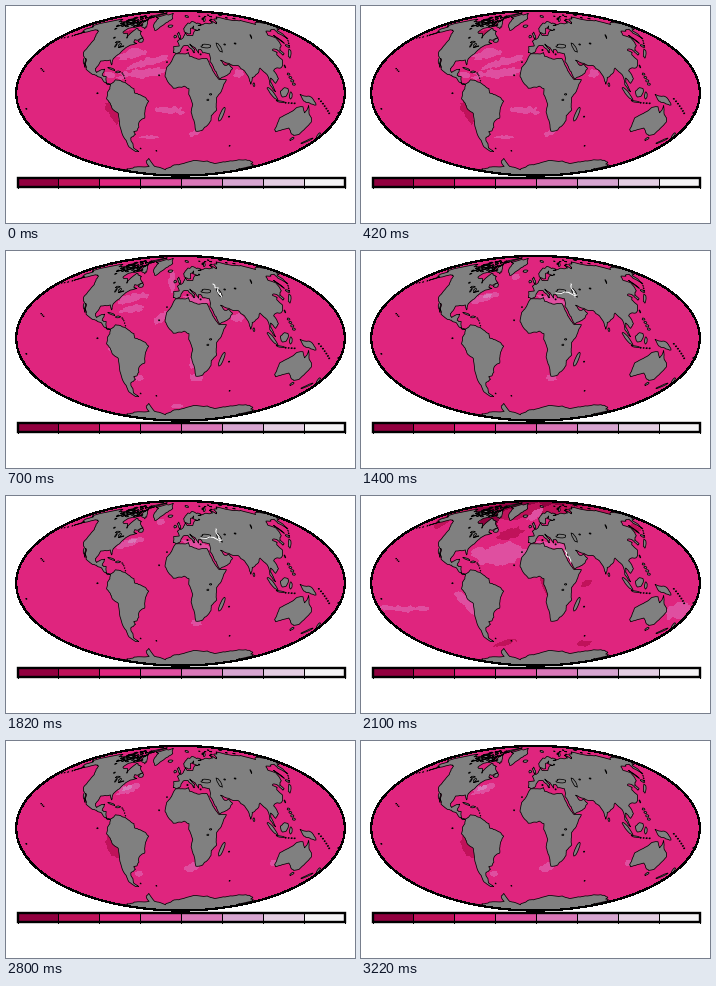
A matplotlib script that plays this animation: 349 by 217 pixels, repeating every 3500 ms.

```python
import numpy as np
import matplotlib.pyplot as plt
from matplotlib.animation import FuncAnimation
from matplotlib.patches import Ellipse, Polygon, Rectangle

W, H, DPI = 349, 217, 64
CX, CY, RX, RY = 174.5, 87.2, 164.3, 82.3
PX = 72 / DPI
LEVELS = ["#91003f", "#c0125a", "#df257e", "#df4fa0",
          "#d978b8", "#d6a5d0", "#e3cee2", "#f5f4f6"]
DARK, RED, SEA, PINK, PALE = LEVELS[:5]
GRAY = "#808080"

rng = np.random.default_rng(4)
fig = plt.figure(figsize=(W / DPI, H / DPI), dpi=DPI, facecolor="white")
ax = fig.add_axes([0, 0, 1, 1])
ax.set(xlim=(0, W), ylim=(H, 0))
ax.axis("off")

globe = Ellipse((CX, CY), 2 * RX, 2 * RY, fc=SEA, ec="none", aa=False, zorder=0)
ax.add_patch(globe)

THETA = np.linspace(-np.pi / 2, np.pi / 2, 4001)
SINLAT = (2 * THETA + np.sin(2 * THETA)) / np.pi


def mollweide(pts):
    lon, lat = pts[:, 0], np.clip(pts[:, 1], -90, 90)
    t = np.interp(np.sin(np.radians(lat)), SINLAT, THETA)
    return np.column_stack([CX + RX * lon / 180 * np.cos(t), CY - RY * np.sin(t)])


def fractal(pts, depth=3, amp=0.07):
    """Roughen a closed outline by shifting edge midpoints sideways."""
    p = np.array(pts, float).reshape(-1, 2)
    for _ in range(depth):
        edge = np.roll(p, -1, axis=0) - p
        side = np.column_stack([-edge[:, 1], edge[:, 0]])
        mid = p + edge / 2 + side * rng.normal(0, amp, (len(p), 1))
        p = np.stack([p, mid], axis=1).reshape(-1, 2)
    return p


def blob(x, y, w, h, tilt=0, rough=0.1, n=14):
    """Ragged ellipse around (x, y); tilt in degrees."""
    a = np.linspace(0, 2 * np.pi, n, endpoint=False)
    r = 1 + rng.normal(0, rough, n)
    u, v = w / 2 * r * np.cos(a), h / 2 * r * np.sin(a)
    t = np.radians(tilt)
    return np.column_stack([x + u * np.cos(t) - v * np.sin(t),
                            y + u * np.sin(t) + v * np.cos(t)])


def add_shape(xy, **style):
    shape = Polygon(xy, closed=True, joinstyle="round", **style)
    ax.add_patch(shape)
    shape.set_clip_path(globe)
    return shape


def land(pts):
    add_shape(mollweide(pts), fc=GRAY, ec="black", lw=0.75 * PX, zorder=3)


def coast(*flat, amp=0.07):
    land(fractal(flat, amp=amp))


def island(lon, lat, w, h, tilt=0, rough=0.12):
    land(blob(lon, lat, w, h, tilt, rough))


def chain(start, end, n, size, bow=0):
    """Row of small islands, optionally bent north or south."""
    for s in np.linspace(0, 1, n):
        lon, lat = np.add(np.multiply(start, 1 - s), np.multiply(end, s))
        island(lon, lat + bow * np.sin(np.pi * s), 1.5 * size, size)


# North and Central America
coast(-168, 65.5, -166, 68.5, -157, 71, -128, 70, -95, 68, -94, 72, -82, 69,
      -87, 64, -93, 62, -94, 58, -82, 55, -79, 51.5, -78, 62.5, -70, 60,
      -65, 59, -56, 52.5, -66, 50, -64, 46.5, -60, 46, -70, 43, -76, 36,
      -81, 31.5, -80.3, 25.4, -84, 30, -95, 29, -97.7, 22, -95, 18.5,
      -90.5, 21, -87, 21.5, -88, 16, -83.3, 15, -82, 9, -77.3, 8, -80, 7.5,
      -87.5, 13, -94, 16, -105.5, 20, -112.5, 30, -114.8, 31.6, -110, 23,
      -115, 28, -117, 32.5, -122.5, 37.5, -124, 48, -130, 54.5, -139, 59.8,
      -146, 60.8, -164, 54.6, -158, 58.5, -165.5, 61.5, -161, 64)

# South America
coast(-77.3, 8, -72, 12, -61, 9.5, -51, 4, -50, 0, -39, -3.5, -35, -7,
      -39, -13, -41, -22, -48.5, -26, -53.5, -34, -58, -35, -57, -37.5,
      -65, -41, -66, -47, -69, -51, -65, -55, -70, -55, -74.5, -50,
      -73.5, -37, -70.3, -18, -76, -14, -81.2, -5, -80, 1, -77.5, 4, amp=0.05)

# Africa
coast(-6, 35.8, 10, 37, 11, 33.5, 20, 31, 32, 31.2, 37.5, 19, 43, 12,
      51, 12, 45, 2, 39.5, -4, 40.5, -15, 35, -20, 35.5, -24, 32, -29,
      27, -33.5, 19, -34.5, 14.5, -23, 12, -17, 13.5, -10, 9, -1, 9.3, 4,
      4, 6.3, -8, 4.4, -13, 9, -17.3, 15, -16, 23, -10, 30, amp=0.04)

# Eurasia: Atlantic and Arctic, Pacific, Indian Ocean, Mediterranean
north = [-5.5, 36, -9, 37, -9, 43, -1.5, 43.6, -4.5, 48.4, 4, 52, 8, 57,
         10.5, 54.3, 19, 54.5, 23, 59, 30, 60, 21.5, 62, 25, 65.3, 17.5, 62,
         16, 56.5, 12.5, 56, 6, 58.5, 5.5, 62, 16, 69, 27, 71, 41, 67.5,
         34, 66, 44, 67, 67, 69, 69, 73, 73, 68, 81, 73.5, 104, 77.6,
         113, 74, 140, 72.5, 160, 69.7, 180, 68.8]
east = [180, 65, 163, 59.5, 157, 51, 156, 57, 163, 61.5, 143, 59.3,
        135, 54.7, 141, 52, 135, 43.5, 127.5, 39.5, 129.4, 36, 126.5, 34.5,
        124.5, 40, 118, 39, 122, 37.2, 119.3, 35, 122, 30, 117, 23.5,
        106, 20, 109, 13, 105, 8.7, 100.5, 13.5, 99.5, 10, 104, 1.3,
        98.3, 8, 97, 17, 91.5, 22.5, 80, 14, 77.5, 8, 72.8, 20]
south = [67, 24.8, 56, 27, 48, 29.8, 51.5, 25, 56.3, 26, 59.8, 22.4,
         55, 17.5, 44, 12.8, 39, 21, 35, 28.5, 36, 36, 28, 36.7, 26.3, 40,
         23.5, 40, 22.8, 36.5, 19, 42, 12.7, 45.4, 18.5, 40, 16, 38,
         10, 44, 3.2, 43, -1, 37.3]
coast(*north, *east, *south, amp=0.06)

# Australia, New Guinea, New Zealand
coast(114, -22, 122, -18, 129, -13, 136, -12, 140, -17.5, 142, -11,
      146, -19, 153, -26, 150, -37.5, 144, -38.5, 136, -34.5, 131, -31.5,
      118, -35, 115, -33, amp=0.05)
coast(131, -1, 141, -2.6, 150, -10.5, 138, -8)
island(146.5, -42, 3.5, 3)
island(176, -38.5, 6, 2.4, -50)
island(170, -44, 9, 2.4, 40)

# Antarctica
coast(-160, -78, -115, -74, -75, -73, -66, -66, -57, -63, -62, -73,
      -45, -78, -18, -72, 0, -70, 52, -66, 70, -69, 100, -66, 135, -66,
      168, -72, 164, -77, 180, -78, 180, -90, -180, -90, -180, -78, amp=0.03)

# Arctic islands
coast(-73, 78, -32, 83.5, -20, 75, -32, 68, -43.5, 60, -53, 67, -58, 75.5)
island(-72, 68, 26, 5, -28, 0.25)
island(-110, 71.5, 15, 4, 0, 0.25)
island(-122, 73, 7, 3)
island(-78, 80, 24, 5, 18, 0.25)
island(-84, 64.5, 6, 2)
island(59, 74, 15, 2, 22)
island(19, 78.5, 10, 3)
for _ in range(45):
    island(rng.uniform(-125, -75), rng.uniform(65, 79),
           rng.uniform(2, 8), rng.uniform(0.5, 1.6), rng.uniform(-30, 30), 0.3)
for _ in range(12):
    island(rng.uniform(50, 140), rng.uniform(73, 81), 4, 0.8)

# Other islands
island(-19, 65, 9, 3)
island(-2, 54, 8, 3.5, -65, 0.2)
island(-8, 53.3, 3.5, 3)
island(-56, 49, 6, 4)
island(-79, 21.7, 9, 1.2, -15)
island(-71, 19, 5, 1.5)
island(46.8, -19, 13, 4, 70, 0.05)
island(80.8, 7.5, 2, 3)
island(136.5, 36, 13, 2.2, 42)
island(143, 43.5, 4, 2.5)
island(143, 50, 1.4, 8)
island(121, 24, 1.2, 2.5)
island(114, 1, 9, 8, 40)
island(101, -0.5, 15, 3, -45)
island(110, -7.4, 9, 1.2, -8)
island(121, -2, 3, 6)
chain((121.5, 17), (125, 8), 4, 2)
chain((116, -8.5), (126, -9), 4, 0.9)
chain((-66, 18), (-61, 11), 5, 0.5, 1)
chain((-179, 52), (-165, 54), 5, 0.6, -1)
chain((146, 44), (156, 51), 4, 0.6)
chain((152, -5), (168, -18), 7, 0.9)
chain((-160, 22), (-155.5, 19.5), 3, 0.6)
chain((9, 39.5), (25, 35.3), 3, 1.1)
for lon, lat in [(178, -17.5), (70, -49), (-59, -51.8), (-37, -54.3),
                 (-91, 0), (-172, -14), (-24, 16), (-16, 28), (55.5, -21)]:
    island(lon, lat, 1.3, 0.9)

# Inland waters, drawn as outlines
island(34, 43.3, 13, 3.5)
island(51, 42, 4.5, 9, 15)
island(-88, 47.5, 7, 1.5)
island(-87, 44, 1.5, 4)
island(-82, 44.5, 3.5, 3)
island(-79, 42.7, 6, 0.8, 15)
island(106.5, 53.3, 6, 0.8, 45)
for lon, lat in [(33, -1), (30, -6), (-98, 52), (-114, 62), (-121, 66),
                 (32, 61), (60, 45), (75, 46)]:
    island(lon, lat, 2.2, 1.2)

# Shaded water per scene: colour, centre, width, height, tilt in stage pixels
MED = (PINK, 190, 49, 26, 6, 10)
PERU = (RED, 106, 106, 22, 7, 62)
scenes = [
    [(PINK, 127, 48, 30, 7, -15), (PINK, 140, 57, 36, 6, -14),
     (PINK, 136, 67, 44, 7, -5), (PINK, 163, 104, 32, 6, 5),
     (PINK, 144, 131, 20, 2), (PINK, 189, 127, 10, 4, -20),
     (PINK, 233, 68, 9, 7), (PINK, 104, 69, 8, 5), PERU,
     (RED, 221, 60, 9, 5), (RED, 125, 27, 10, 5)],
    [(PINK, 126, 47, 28, 7, -18), (PINK, 128, 58, 26, 6, -12),
     (PINK, 154, 67, 15, 5, -45), (PINK, 166, 31, 5, 18), MED,
     (PINK, 190, 127, 13, 6), (PINK, 133, 127, 7, 5),
     (PINK, 186, 112, 5, 9), (PINK, 231, 67, 11, 7),
     (PINK, 171, 155, 11, 3), (PINK, 108, 100, 10, 4, 30)],
    [(PINK, 122, 47, 24, 7, -15), (PALE, 126, 45, 8, 2, -15),
     (PINK, 155, 26, 7, 5), MED, (PINK, 191, 127, 8, 5)],
    [(RED, 171, 12, 180, 18), (DARK, 172, 7, 150, 9), (DARK, 127, 27, 17, 11),
     (RED, 149, 38, 25, 9, -15), (RED, 81, 26, 16, 6, -25),
     (RED, 273, 33, 15, 6), (PINK, 135, 59, 54, 19), MED,
     (PINK, 175, 18, 17, 6, -40), (PINK, 43, 112, 52, 4),
     (PINK, 112, 111, 40, 9, 35), (PINK, 318, 115, 30, 13, -10),
     (RED, 145, 147, 20, 4, -15), (RED, 224, 147, 12, 4, -10),
     (RED, 226, 87, 9, 5, -30), (RED, 184, 88, 20, 5, 75)],
    [(PINK, 122, 48, 26, 7, -18), (PALE, 121, 47, 9, 3, -20),
     (PINK, 187, 126, 16, 7, -25), (PINK, 267, 122, 5, 5),
     (PINK, 133, 133, 7, 4), PERU],
]

# White wandering lines per scene: start and end
tracks = {1: [((207, 33), (216, 46))],
          2: [((195, 42), (216, 44)), ((210, 33), (214, 46))],
          3: [((204, 54), (210, 66))]}


def wander(start, end, n=9, amp=1.3):
    s = np.linspace(0, 1, n)[:, None]
    sway = rng.normal(0, amp, (n, 2)) * np.sin(np.pi * s)
    return np.array(start) * (1 - s) + np.array(end) * s + sway


groups = []
for i, scene in enumerate(scenes):
    group = [add_shape(fractal(blob(*spec, rough=0.18), 2, 0.15), fc=color,
                       ec="none", aa=False, zorder=1)
             for color, *spec in scene]
    for start, end in tracks.get(i, []):
        group += ax.plot(*wander(start, end).T, color="white", lw=PX, zorder=4)
    groups.append(group)

ax.add_patch(Ellipse((CX, CY), 2 * RX, 2 * RY, fc="none", ec="black",
                     lw=1.2 * PX, aa=False, zorder=5))

# Colour bar
X0, X1, Y0, Y1 = 11.5, 338.5, 172, 181
step = (X1 - X0) / len(LEVELS)
for i, color in enumerate(LEVELS):
    ax.add_patch(Rectangle((X0 + i * step, Y0), step, Y1 - Y0, fc=color,
                           ec="none", zorder=6))
for x in X0 + step * np.arange(len(LEVELS) + 1):
    ax.plot([x, x], [Y0 - 1.5, Y1 + 1], color="black", lw=PX, zorder=7)
ax.add_patch(Rectangle((X0, Y0), X1 - X0, Y1 - Y0, fc="none", ec="black",
                       lw=2.4 * PX, zorder=8))


def update(k):
    for i, group in enumerate(groups):
        for artist in group:
            artist.set_visible(i == k)
    return []


update(0)
anim = FuncAnimation(fig, update, frames=len(scenes), interval=700,
                     repeat=True, repeat_delay=0, blit=False)
plt.show()
```
